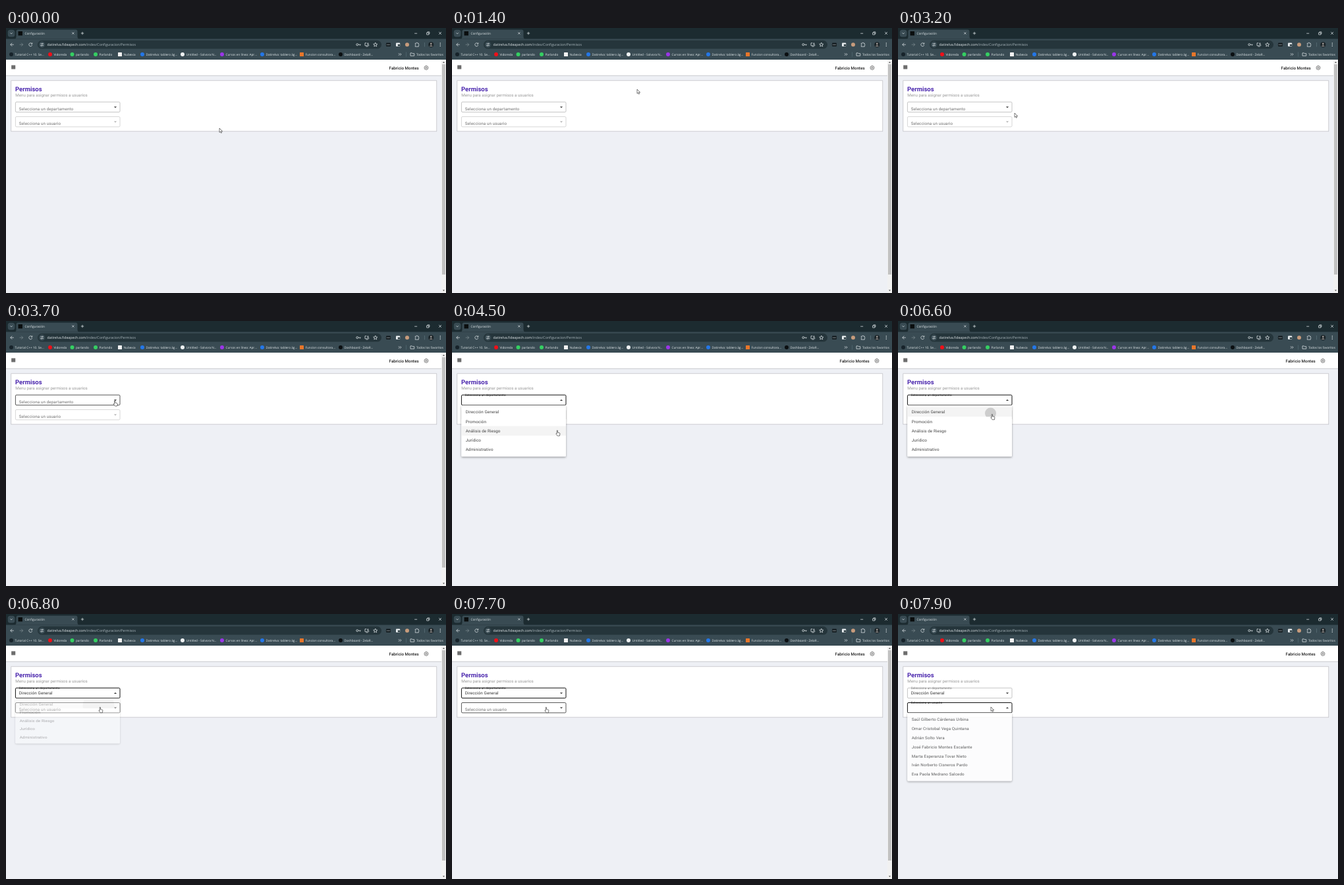
Recreate the animation shown at these times as an HTML page. Size 668 px wide and 402 px high, loop 8000 ms.

```html
<!DOCTYPE html>
<html lang="es">
<head>
<meta charset="utf-8">
<title>Configuración</title>
<style>
html, body { margin: 0; width: 100%; height: 100%; overflow: hidden; background: #eef0f5; }
svg { display: block; width: 668px; height: 402px; text-rendering: geometricPrecision; }
.ui { font: 4.7px "Open Sans", "Noto Sans", sans-serif; fill: #e6ecee; }
.app { font: 6.26px Roboto, sans-serif; }
.field { letter-spacing: .11px; }
.line { fill: none; stroke: #dfe6e8; stroke-width: .75; }
</style>
</head>
<body>
<svg viewBox="0 0 668 402">
  <defs>
    <filter id="shadow" x="-10%" y="-10%" width="120%" height="125%">
      <feDropShadow dx="0" dy="1.4" stdDeviation="1.5" flood-opacity=".38"/>
    </filter>
    <clipPath id="row"><rect x="14" y="130.9" width="159" height="14.3"/></clipPath>
  </defs>
  <g id="chrome"></g>
  <g id="page"></g>
</svg>
<script>
const LOOP = 8000, STEP = 100;
const rect = (x, y, w, h, fill, more = '') =>
  `<rect x="${x}" y="${y}" width="${w}" height="${h}" fill="${fill}" ${more}/>`;
const disc = (x, y, r, fill, more = '') => `<circle cx="${x}" cy="${y}" r="${r}" fill="${fill}" ${more}/>`;
const path = (d, more = 'class="line"') => `<path d="${d}" ${more}/>`;
const text = (x, y, s, more = '') => `<text x="${x}" y="${y}" ${more}>${s}</text>`;

// Browser frame
const bookmarks = [
  [8, '#17232a', 'Tutorial C++ 10. Se...'], [67, '#f00f18', 'Vidoreda'],
  [100.5, '#35cf62', 'parlando'], [136, '#35cf62', 'Parlando'],
  [173, '#f2f2f2', 'Nubexia', 1], [207, '#2477e8', 'Datirelva: tablero ág...'],
  [268, '#eef1f2', 'Untitled - Solvora N...'], [328, '#9b35e8', 'Cursos en línea: Apr...'],
  [389, '#2477e8', 'Datirelva: tablero ág...'], [449, '#e8762a', 'Funcion consultora...', 1],
  [508, '#0b0f11', 'Dashboard - ZelaR...']
];

function chrome() {
  const marks = bookmarks.map(([x, color, label, square]) =>
    (square ? rect(x - 3, 37, 6, 6, color, 'rx=".6"') : disc(x, 40, 3, color)) +
    text(x + 5.5, 41.6, label)).join('');
  return `<g class="ui">` +
    rect(0, 0, 668, 18, '#1c2b30') + rect(0, 16.5, 668, 31.5, '#394b53') +
    path('M12.500 16.500Q15.500 16.500 15.500 13V5.500Q15.500 2.500 18.500 2.500H105.500Q108.500 2.500 108.500 5.500V13Q108.500 16.500 111.500 16.500Z', 'fill="#394b53"') +
    rect(2.8, 2.8, 10.6, 10.6, '#394b53', 'rx="3.5"') + path('M6.500 7.300L8.100 8.900L9.700 7.300') +
    rect(18.5, 5, 6.4, 6.4, '#0a0d0e') + text(28.5, 10, 'Configuración') +
    path('M100.300 6.500L103.300 9.500M103.300 6.500L100.300 9.500M113.800 8H118.200M116 5.800V10.200') +
    path('M620.200 8.200H624.200M638.700 7H641.800V10.100H638.700ZM639.900 7V5.900H642.900V9H641.800M657.200 6L661 9.800M661 6L657.200 9.800') +
    path('M11.800 25.200H6.800M9.200 22.700L6.700 25.200L9.200 27.700') +
    path('M20.600 25.200H25.600M23.200 22.700L25.700 25.200L23.200 27.700', 'class="line" opacity=".4"') +
    path('M39.300 23.700A2.500 2.500 0 1 0 39.700 26M39.800 22.300V24.300H37.800') +
    rect(48, 18.8, 522, 12.8, '#25353b', 'rx="6.400"') + disc(54.6, 25.2, 4.7, '#394b53') +
    path('M52.300 23.900H54.200M55.600 23.900H57M52.300 26.600H53.600M55 26.600H57') +
    disc(55.2, 23.9, .8, 'none', 'stroke="#dfe6e8" stroke-width=".6"') +
    disc(54, 26.6, .8, 'none', 'stroke="#dfe6e8" stroke-width=".6"') +
    text(62.5, 27.1, 'datirelva.fideapech.com<tspan fill="#aebbc0">/index/Configuracion/Permisos</tspan>', 'style="font-size:5.25px"') +
    disc(533.3, 25.2, 1.5, 'none', 'stroke="#dfe6e8" stroke-width=".8"') + path('M535 25.200H538.700M537.500 25.200V26.600') +
    path('M547.500 22.800H545V26.800H550.800V25.500M546.500 28H549.500M549.500 22.200V25M548.200 23.900L549.500 25.200L550.800 23.900') +
    path('M560.800 22.100L561.700 24.200L563.900 24.400L562.200 25.800L562.700 28L560.800 26.800L558.900 28L559.400 25.800L557.700 24.400L559.900 24.200Z') +
    rect(577, 22.5, 7, 5.5, '#151d21', 'rx="1"') + [578.7, 580.5, 582.3].map(x => disc(x, 25.3, .55, '#dfe6e8')).join('') +
    rect(592, 22.5, 6.2, 5.6, '#e9eef0', 'rx="1"') + rect(594.8, 24.8, 3.2, 2.6, '#25353b') +
    disc(609, 25.3, 3, '#c79b7c') +
    path('M621.300 23.200H622.900A1 1 0 0 1 624.900 23.200H626.300V24.800A1 1 0 0 1 626.300 26.700V28.200H621.300V26.500A1 1 0 0 0 621.300 24.700Z') +
    rect(635, 22, .6, 6.500, '#637880') + disc(645.3, 25.2, 4, '#1b2428') +
    disc(645.3, 24, 1.4, '#9b9692') + path('M642.700 27.900Q645.300 24.500 647.900 27.900Z', 'fill="#9b9692"') +
    [23, 25.2, 27.4].map(y => disc(659.3, y, .65, '#dfe6e8')).join('') +
    marks + path('M596 38.300L597.700 40L596 41.700M598.400 38.300L600.100 40L598.400 41.700') +
    rect(607, 36.5, .5, 7, '#637880') + path('M614 42.200V37.900H616.200L617 38.700H619.800V42.200Z') +
    text(623, 41.6, 'Todos los favoritos') + '</g>';
}

// Web page
const areas = ['Dirección General', 'Promoción', 'Análisis de Riesgo', 'Jurídico', 'Administrativo'];
const users = ['Saúl Gilberto Cárdenas Urbina', 'Omar Cristobal Vega Quintana', 'Adrián Solto Vera',
  'José Fabricio Montes Escalante', 'Marta Esperanza Tovar Nieto', 'Iván Norberto Cisneros Pardo',
  'Eva Paola Medrano Salcedo'];
const ROW = 14.3;

// Pointer tip: time, x, y
const track = [
  [100, 324, 152], [300, 284.5, 100], [1300, 284.5, 100], [1400, 281, 93], [1800, 234.5, 175],
  [2100, 234.5, 175], [2300, 234, 167.5], [2800, 234, 167.5], [3200, 177, 129], [3500, 166, 121],
  [3600, 166, 121], [3900, 158, 119], [4100, 158, 119], [4500, 158, 165.5], [4500, 158, 165.5],
  [4900, 60, 189], [5200, 60, 189], [6000, 141, 141], [LOOP, 141, 141]
];

function pointerAt(t) {
  const i = track.findIndex(k => k[0] >= t);
  if (i < 1) return track[0].slice(1);
  const [t0, x0, y0] = track[i - 1], [t1, x1, y1] = track[i];
  const k = (t - t0) / (t1 - t0);
  return [x0 + (x1 - x0) * k, y0 + (y1 - y0) * k];
}

function gear(x) {
  let d = '';
  for (let i = 0; i < 32; i++) {
    const a = (i - .5) * Math.PI / 16, r = i % 4 < 2 ? 3.2 : 2.5;
    d += `${i ? 'L' : 'M'}${x + r * Math.sin(a)} ${60.3 - r * Math.cos(a)}`;
  }
  const stroke = 'fill="none" stroke="#444" stroke-width=".65"';
  return path(d + 'Z', stroke) + disc(x, 60.3, 1.1, 'none', 'stroke="#444" stroke-width=".65"');
}

function select(y, label, { value = '', open, focus, hover, disabled }) {
  const dark = focus || hover;
  const border = dark ? '#111' : disabled ? '#c6c6c6' : '#adadad';
  const tip = open ? 'M163.900 121L166 118.900L168.100 121Z' : 'M163.900 119.200H168.100L166 121.300Z';
  return `<g class="field" transform="translate(0 ${y - 112})">` +
    (open || value
      ? text(19.8, 113.6, label, `fill="${focus ? '#333' : '#666'}" style="font-size:4.7px;letter-spacing:.083px"`)
      : text(19.8, 125.1, label, 'fill="#707070"')) +
    rect(14.4, 112.2, 158.6, 15.4, 'none', `rx="1.600" stroke="${border}" stroke-width="${focus ? 1 : .7}"`) +
    text(19.8, 122.2, value, 'fill="#333"') +
    path(tip, `fill="${disabled ? '#aaa' : '#333'}"`) + '</g>';
}

function panel(top, items, alpha, hover, ripple = '') {
  const scale = .8 + .2 * alpha;
  return `<g class="field" opacity="${alpha}" transform="translate(0 ${top * (1 - scale)}) scale(1 ${scale})">` +
    rect(14.2, top, 158.8, items.length * ROW + 6.3, '#fff', 'rx="1.500" filter="url(#shadow)"') +
    (hover >= 0 && hover < items.length ? rect(14.2, top + 3.1 + hover * ROW, 158.8, ROW, '#f4f4f4') : '') + ripple +
    items.map((s, i) => text(20.7, top + 12.4 + i * ROW, s, 'fill="#444"')).join('') + '</g>';
}

function cursor(x, y, hand) {
  const d = hand
    ? 'M1.200 .700Q1.900 0 2.500 .700V3.700L5 4.200Q6 4.500 5.900 5.500L5.400 8.700H2.100L0 5.900Q-.200 5 .600 5L1.200 5.500Z'
    : 'M0 0V6.400L1.500 5.100L2.500 7.300L3.600 6.800L2.600 4.700H4.600Z';
  return path(d, `transform="translate(${x} ${y})" fill="#fff" stroke="#222" stroke-width=".6" stroke-linejoin="round"`);
}

function page(t) {
  const [x, y] = pointerAt(t);
  const open1 = t >= 3900 && t < 6900, open2 = t >= 7800;
  const chosen = t >= 6700, locked = t >= 3900 && t < 6800 || open2;
  const alpha1 = t < 4000 ? .6 : t < 6800 ? 1 : .4;
  const inside = top => x > 14 && x < 173 && y > top && y < top + 16;
  const row = Math.floor((y - 130.9) / ROW);
  const hover1 = !locked && inside(112), hover2 = !locked && chosen && inside(134);
  const hand = hover1 || hover2 || open1 && row >= 0 && row < areas.length;
  const shift = locked ? 7 : 0;
  const ripple = t >= 6600 && open1
    ? disc(140.5, 140, t < 6700 ? 8.5 : 24, '#000', `opacity="${t < 6700 ? .16 : .07}" clip-path="url(#row)"`) : '';

  return `<g class="app">` +
    rect(0, 48, 668, 354, '#eef0f5') + rect(0, 48, 668, 24, '#fff') + rect(0, 71.8, 668, .7, '#b9b9bd') +
    rect(8.2, 56.4, 6, 6, '#777') + [57.8, 59.3, 60.8].map(v => rect(8.2, v, 6, .4, '#555')).join('') +
    text(626.8 + shift, 62.6, 'Fabricio Montes', 'text-anchor="end" font-weight="500" fill="#222"') + gear(638 + shift) +
    rect(7.8, 79.8, 646, 77, '#fff', 'stroke="#bcbcc2" stroke-width=".7"') +
    text(14, 95.6, 'Permisos', 'fill="#4a26ad" style="font-weight:700;font-size:9.5px"') +
    text(14.2, 103.9, 'Menu para asignar permisos a usuarios', 'fill="#999"') +
    select(112, 'Selecciona un departamento', {
      value: chosen ? areas[0] : '', open: open1, focus: t >= 3900 && !open2, hover: hover1
    }) +
    select(134.3, 'Selecciona un usuario', { open: open2, focus: open2, hover: hover2, disabled: !chosen }) +
    (open1 ? panel(127.8, areas, alpha1, row, ripple) : '') +
    (open2 ? panel(150, users, t < 7900 ? .4 : .85, -1) : '') +
    (locked ? '' : rect(661, 48, 7, 354, '#f1f1f1') + rect(662, 55, 5, 319, '#c1c1c1') +
      path('M663 53L664.500 51L666 53ZM663 397.300L664.500 399.300L666 397.300Z', 'fill="#555"')) +
    cursor(x, y, hand) + '</g>';
}

const stage = document.getElementById('page');
document.getElementById('chrome').innerHTML = chrome();
const start = performance.now();
let shown = -1;
function tick() {
  const t = Math.floor((performance.now() - start) % LOOP / STEP) * STEP;
  if (t !== shown) stage.innerHTML = page(shown = t);
  requestAnimationFrame(tick);
}
tick();
</script>
</body>
</html>
```
